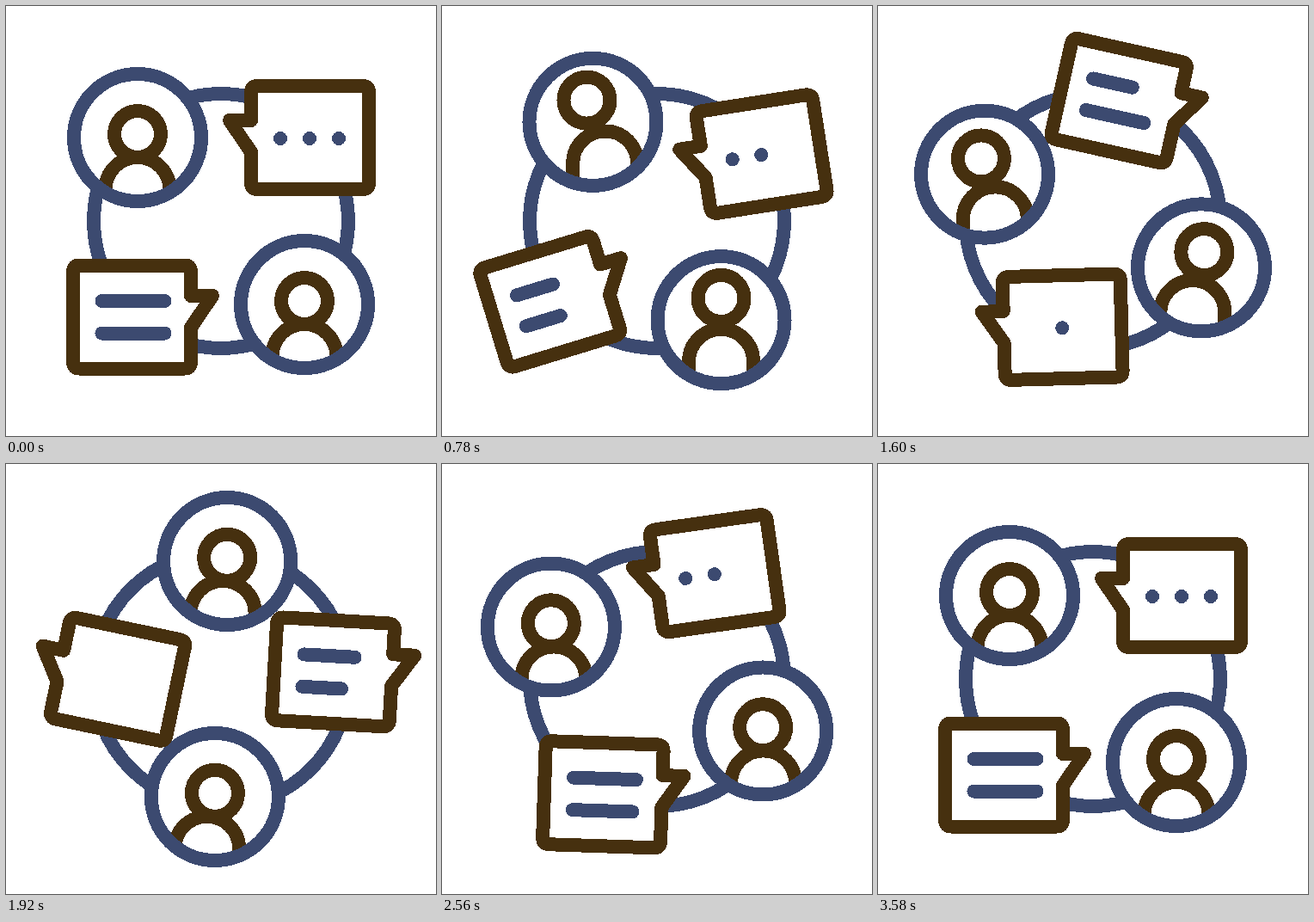
Recreate the animation shown at these times as an HTML page. Size 500 by 500 pixels, loop 3600 ms.

```html
<!DOCTYPE html>
<html lang="en">
<head>
<meta charset="utf-8">
<title>Conversation loop</title>
<style>
html, body { margin: 0; width: 100%; height: 100%; overflow: hidden; background: #fff; }
svg { display: block; width: 100vw; height: 100vh; shape-rendering: crispEdges; }
.line { fill: none; stroke-width: 16; stroke-linecap: round; stroke-linejoin: round; }
.blue { stroke: #3c4a70; }
.brown { stroke: #46300f; }
.paper { fill: #fff; }
.dot { fill: #3c4a70; }
</style>
</head>
<body>
<svg viewBox="0 0 500 500">
  <defs>
    <clipPath id="face"><circle r="76"/></clipPath>
    <g id="avatar">
      <circle class="paper" r="74"/>
      <g clip-path="url(#face)">
        <path class="line brown body" d="M-37.500 110V60.500A37.500 37.500 0 0 1 37.500 60.500V110"/>
        <circle class="line brown head" r="27"/>
      </g>
      <circle class="line blue" r="74"/>
    </g>
  </defs>
  <circle class="line blue" cx="250" cy="250" r="148"/>
  <g id="people"></g>
  <g id="dots">
    <path class="line brown paper shell"/>
    <circle class="dot" cx="-21.500" cy="1" r="8"/>
    <circle class="dot" cx="12.500" cy="1" r="8"/>
    <circle class="dot" cx="46.500" cy="1" r="8"/>
  </g>
  <g id="lines">
    <path class="line brown paper shell" transform="scale(-1 1)"/>
    <path class="line blue"/>
    <path class="line blue"/>
  </g>
</svg>
<script>
const LOOP = 3600;
const $ = (sel, root = document) => root.querySelector(sel);

// Smooth 0 to 1 step over a stretch of time.
function ease(t, start, length) {
  const u = Math.min(1, Math.max(0, (t - start) / length));
  return u * u * (3 - 2 * u);
}

// Winds up, makes a full turn with overshoot, settles.
function turnAt(t) {
  return -10 * ease(t, 0, 400) + 380 * ease(t, 400, 2600) - 10 * ease(t, 3000, 400);
}

// Pendulum: each half swing is smaller and shorter than the last.
function swing(t, start, lead) {
  let value = 0, peak = 0, length = lead;
  for (let k = 0; k <= 4; k++) {
    const next = (k % 2 ? -1 : 1) * (1 - k / 4);
    value += (next - peak) * ease(t, start, length);
    start += length;
    peak = next;
    length = 840 * 0.72 ** k;
  }
  return value;
}

// Three hops, each lower and quicker.
function hop(t) {
  let start = 400, length = 820;
  for (let k = 0; k < 3; k++) {
    const u = (t - start) / length;
    if (u >= 0 && u < 1) return Math.sin(Math.PI * u) ** 2 * (1 - k / 3);
    start += length;
    length *= 0.89;
  }
  return 0;
}

// Two equal dips in a row.
function dip(t, start, length) {
  const u = (t - start) / length;
  return u > 0 && u < 2 ? Math.sin(Math.PI * u) ** 2 : 0;
}

function orbit(x, y, deg) {
  const a = deg * Math.PI / 180, c = Math.cos(a), s = Math.sin(a);
  return [250 + x * c - y * s, 250 + x * s + y * c];
}

function place(el, [x, y], tilt = 0) {
  el.setAttribute('transform', `translate(${x.toFixed(3)} ${y.toFixed(3)}) rotate(${tilt.toFixed(3)})`);
}

// Speech bubble with its tail on the left at height y.
function shell(y) {
  return `M-48 -60H74q7.500 0 7.500 7.500V52.500q0 7.500 -7.500 7.500H-48q-7.500 0 -7.500 -7.500` +
    `V${y + 37}L-80.500 ${y}H-55.500V-52.500q0 -7.500 7.500 -7.500Z`;
}

const people = [-97, 97].map((side, i) => {
  const el = $('#avatar').cloneNode(true);
  el.removeAttribute('id');
  $('#people').append(el);
  return { el, side, head: $('.head', el), body: $('.body', el), start: 400 + i * 450, reach: 17.3 + i };
});

const dotBubble = $('#dots'), lineBubble = $('#lines');
$('.shell', dotBubble).setAttribute('d', shell(-20));
$('.shell', lineBubble).setAttribute('d', shell(-24.5));

// Dots leave one by one and come back from left to right.
const dots = [1420, 1920, 620].map((gone, i) => ({
  el: dotBubble.querySelectorAll('.dot')[i], gone, back: 2080 + i * 320
}));
const bars = [...lineBubble.querySelectorAll('.blue')].map((el, i) => ({
  el, y: -18.5 + i * 37.5, start: 340 - i * 110, length: 900 + i * 330, depth: 29 + i * 3
}));

function draw(t) {
  const turn = turnAt(t), jump = hop(t);

  for (const p of people) {
    const sway = p.reach * swing(t, p.start, 520);
    place(p.el, orbit(p.side, p.side, turn));
    place(p.body, [sway, -12.5 * jump]);
    place(p.head, [-0.5 * sway * jump, -4 - 21.5 * jump]);
  }

  place(dotBubble, orbit(90.5, -97, turn), -17 * swing(t, 370, 800));
  place(lineBubble, orbit(-90.5, 111.5, turn), -17 * swing(t, 0, 800));

  for (const d of dots) {
    d.el.setAttribute('visibility', t >= d.gone && t < d.back ? 'hidden' : 'visible');
  }
  for (const b of bars) {
    const width = 73 - b.depth * dip(t, b.start, b.length);
    b.el.setAttribute('d', `M-48 ${b.y}h${width.toFixed(2)}`);
  }
}

const begin = performance.now();
function tick() {
  draw((performance.now() - begin) % LOOP);
  requestAnimationFrame(tick);
}
draw(0);
requestAnimationFrame(tick);
</script>
</body>
</html>
```
